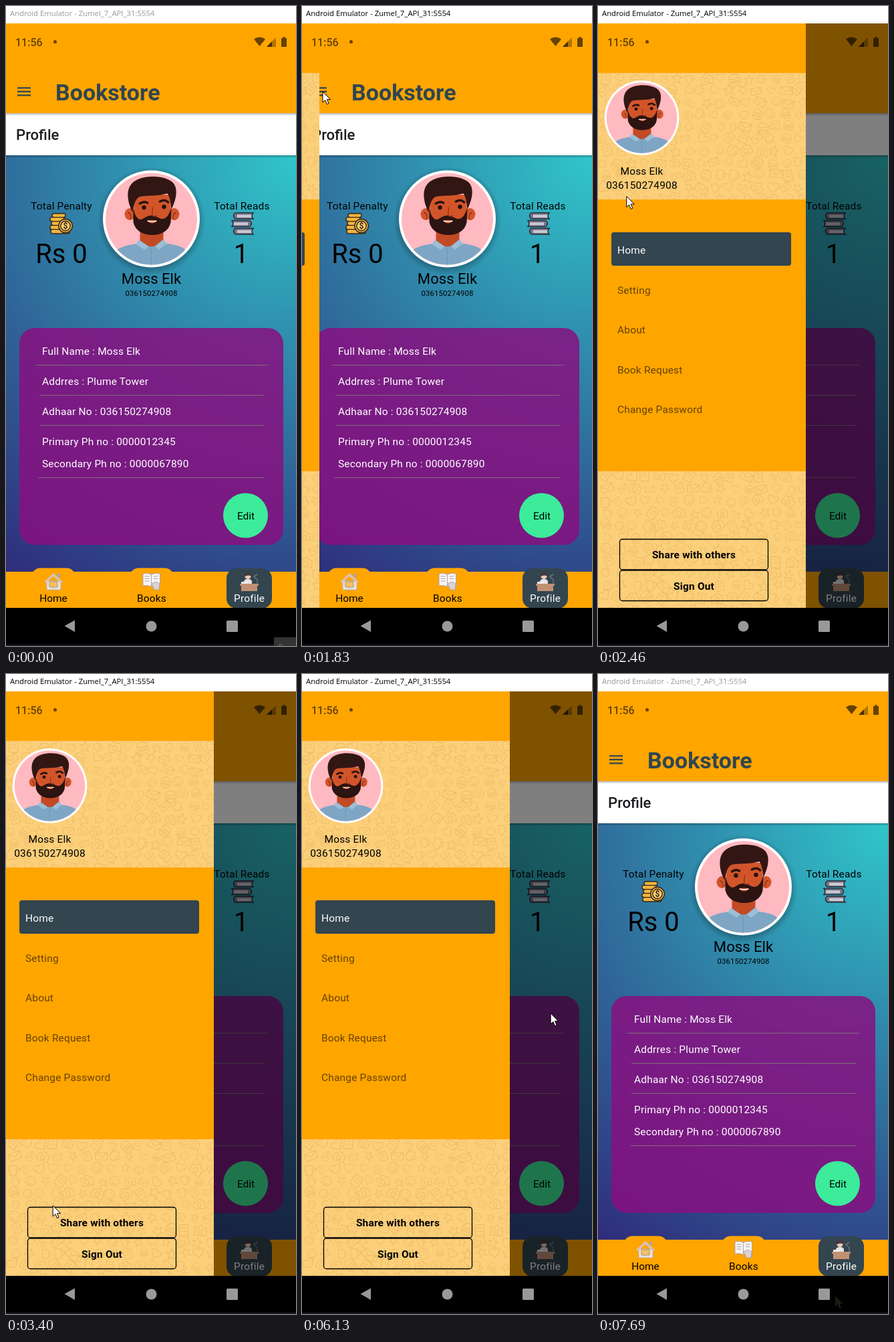
These frames come from a looping animation (434 by 956 pixels, 7760 ms). An HTML page:

```html
<!DOCTYPE html>
<html lang="en">
<head>
<meta charset="utf-8">
<title>Bookstore profile</title>
<style>
  html, body { margin: 0; width: 100%; height: 100%; overflow: hidden; background: #000; }
  svg { display: block; width: 100vw; height: 100vh; }
  text { font: 15.47px Roboto, sans-serif; letter-spacing: .012em; white-space: pre; }
  .mid { text-anchor: middle; }
  .medium { font-weight: 500; }
  .bold { font-weight: 700; }
  .tight { letter-spacing: 0; }
  .line { fill: none; stroke-linecap: round; stroke-linejoin: round; }
</style>
</head>
<body>
<svg viewBox="0 0 434 956" preserveAspectRatio="none">
  <defs>
    <radialGradient id="sea" gradientUnits="userSpaceOnUse" cx="434" cy="224" r="758">
      <stop offset="0" stop-color="#30c6ca"/><stop offset="1" stop-color="#2f2c7b"/>
    </radialGradient>
    <linearGradient id="shade" x2="0" y2="1">
      <stop offset="0" stop-color="#000" stop-opacity=".3"/><stop offset="1" stop-color="#000" stop-opacity="0"/>
    </linearGradient>
    <radialGradient id="halo"><stop offset=".86" stop-opacity=".25"/><stop offset="1" stop-opacity="0"/></radialGradient>
    <clipPath id="round"><circle r="68.5"/></clipPath>
    <clipPath id="top"><rect y="100" width="311" height="189"/></clipPath>
    <clipPath id="bottom"><rect y="695" width="311" height="204"/></clipPath>

    <g id="avatar">
      <circle r="72.5" fill="#fff"/>
      <g clip-path="url(#round)">
        <circle r="69" fill="#ffb9c1"/>
        <path d="M-66 72C-60 46-48 41-22 37H24C48 40 58 46 64 72Z" fill="#7ea6c4"/>
        <path d="M-17 14V37Q0 46 18 36V14Z" fill="#c24a25"/>
        <path d="M-19 31L-4 41-10 46-23 38ZM19 30L5 41 12 46 23 37Z" fill="#9bbfd8"/>
        <path d="M0 42V69" class="line" stroke="#6d94b3" stroke-width=".8"/>
        <ellipse cx="-32" cy="-7" rx="8" ry="9" fill="#d2552a"/>
        <ellipse cx="34" cy="-7" rx="8" ry="9" fill="#d2552a"/>
        <path d="M-35-9q5 0 4 8M37-9q-5 0-4 8" class="line" stroke="#8c2f18" stroke-width="1.3"/>
        <path d="M-26-36H29V2Q25 22 1 23T-26 2Z" fill="#d2552a"/>
        <path d="M-27-18C-25-6-22 0-16 1C-11 0-8-5 0-5S11 0 17 0C23-1 27-6 30-18L29 5C26 19 14 24 1 24S-24 18-27 5Z" fill="#2b1411"/>
        <path d="M-7 3Q1 0 9 3Q2 10-7 3Z" fill="#d2552a"/>
        <path d="M-5 3Q1 5 7 3" class="line" stroke="#fff" stroke-width="1.5"/>
        <path d="M-28-10C-37-27-38-45-28-54C-14-67 24-66 34-52C40-43 37-29 30-14C29-25 28-32 24-38C8-33-8-36-18-33C-25-29-26-20-28-10Z" fill="#321613"/>
        <path d="M-17-23q6-4 11-1M13-26q7-4 12 1" class="line" stroke="#2b1411" stroke-width="3.6"/>
        <circle cx="-11" cy="-17" r="3.2" fill="#241010"/><circle cx="19" cy="-18" r="3.2" fill="#241010"/>
        <path d="M2-17L1-5Q5-2 8-5" class="line" stroke="#8c2f18" stroke-width="1.2"/>
      </g>
    </g>
    <g id="tab"><rect width="68" height="60" rx="15"/></g>
    <g id="book">
      <path d="M2 0H29Q25 5 29 9H2Q-3 4 2 0Z" fill="#77778a"/>
      <path d="M5 2.8H27Q25 5 27 7H5Z" fill="#c9c9d4" stroke="none"/>
    </g>
  </defs>

  <!-- App screen -->
  <rect width="434" height="956" fill="#fff"/>
  <rect y="26" width="434" height="134" fill="#ffa500"/>
  <rect y="223" width="434" height="622" fill="url(#sea)"/>
  <rect y="160" width="434" height="4" fill="url(#shade)"/>
  <rect y="223" width="434" height="4" fill="url(#shade)"/>
  <path d="M17 122.400h20M17 127.900h20M17 133.400h20" stroke="#33454f" stroke-width="2.200"/>
  <text x="74" y="141" class="bold tight" style="font-size:34px" fill="#2f4650">Bookstore</text>
  <text x="15" y="200" class="medium tight" style="font-size:22.1px" fill="#1d1b20">Profile</text>

  <circle cx="217.5" cy="321" r="81" fill="url(#halo)"/>
  <use href="#avatar" x="217.5" y="318"/>
  <g class="mid">
    <text x="83" y="304">Total Penalty</text>
    <text x="353" y="304">Total Reads</text>
    <text x="83" y="384" class="tight" style="font-size:39.8px">Rs 0</text>
    <text x="352" y="384" class="tight" style="font-size:39.8px">1</text>
    <text x="217.5" y="415" class="tight" style="font-size:22.1px">Moss Elk</text>
    <text x="217.5" y="433" style="font-size:11.3px">036150274908</text>
  </g>

  <!-- Coins -->
  <g fill="#f2b63c" stroke="#33241d" stroke-width="1.4">
    <rect x="69" y="310" width="20" height="5.6" rx="2.5"/><rect x="66" y="315.6" width="21" height="6" rx="2.5"/>
    <rect x="68" y="321.6" width="21" height="6" rx="2.5"/><rect x="66" y="327.6" width="21" height="6" rx="2.5"/>
    <rect x="67" y="333.6" width="28" height="6.4" rx="2.5"/>
    <circle cx="89" cy="328.5" r="10.3"/><circle cx="89" cy="328.5" r="7.2" fill="#ffd36b"/>
  </g>
  <text x="89" y="333" class="mid bold" style="font-size:12px" fill="#33241d">$</text>
  <!-- Stacked books -->
  <g stroke="#2d2b38" stroke-width="1.6">
    <use href="#book" x="341" y="309"/><use href="#book" transform="translate(367 320.5) scale(-1 1)"/><use href="#book" x="341" y="332"/>
  </g>

  <!-- Details card -->
  <rect x="20" y="481" width="395" height="324" rx="23" fill="#880f80" opacity=".84"/>
  <path d="M44 536.5H391M50 581.5H386M50 626.5H386M49 704.5H387" stroke="#858078" stroke-opacity=".8"/>
  <g fill="#fff">
    <text x="54" y="520.5">Full Name : Moss Elk</text>
    <text x="54" y="565.5">Addrres : Plume Tower</text>
    <text x="54" y="610.5">Adhaar No : 036150274908</text>
    <text x="54" y="655.5">Primary Ph no : 0000012345</text>
    <text x="54" y="688.5">Secondary Ph no : 0000067890</text>
  </g>
  <circle cx="358.5" cy="761" r="33.5" fill="#3cec9a"/>
  <text x="359" y="767" class="mid tight">Edit</text>

  <!-- Tabs -->
  <g fill="#ffa500">
    <rect y="845" width="434" height="55"/>
    <use href="#tab" x="37" y="839.5"/><use href="#tab" x="184" y="839.5"/>
    <use href="#tab" x="330" y="840" fill="#33454f"/>
  </g>
  <g stroke-width="1">
    <path d="M61 859h21v13H61Z" fill="#e9e3dc" stroke="#b9b1ac"/>
    <path d="M57 860L71 847 85 860 82 862 71 852 60 862Z" fill="#d9c1b2"/>
    <path d="M77 848h4v7l-4-4Z" fill="#aaa3b8"/>
    <path d="M65 860q4-1 6 1 3-2 6-1v8q-4-1-6 1-3-2-6-1Z" fill="#f7c260" stroke="#a88f80"/>
    <path d="M205 848q7-2 12.500 1 6-3 13-1v18q-7-1-13 1-6-2-12.500-1Z" fill="#f8f4f3" stroke="#a9a0a4"/>
    <path d="M217.500 849v17M207.500 852h7M207.500 855.500h7M207.500 859h7M220.500 852h7M220.500 855.500h7" stroke="#aaa2a8"/>
    <path d="M218 863l6-3 6 3-1 9h-7Z" fill="#ddd3d2" stroke="#aaa2a8"/>
    <path d="M356 860q0-4 6-4 6 0 6 4v4h-12Z" fill="#e8e2e4"/>
    <circle cx="362" cy="851.500" r="4.600" fill="#f2c9ae"/>
    <path d="M357 852q-1-6 5-6 6 0 5 6-3-3-10 0Z" fill="#4b3540"/>
    <path d="M350 863h28v3h-2v8h-24v-8h-2Z" fill="#c19174"/>
    <path d="M352 863h9v-3h-9Z" fill="#eee"/>
    <path d="M376 863v-6l-5-5 5-3" class="line" stroke="#6c7079" stroke-width="1.500"/>
  </g>
  <g class="mid">
    <text x="71" y="890" class="tight">Home</text>
    <text x="218" y="890">Books</text>
    <text x="364" y="890" fill="#fff">Profile</text>
  </g>

  <rect id="scrim" y="26" width="434" height="874"/>

  <!-- Navigation drawer -->
  <g id="drawer">
    <rect y="26" width="311" height="873" fill="#ffa500"/>
    <path d="M0 100H311V289H0ZM0 695H311V899H0Z" fill="#fccf7b"/>
    <g clip-path="url(#top)"><g id="doodlesTop"/></g>
    <g clip-path="url(#bottom)"><g id="doodlesBottom"/></g>
    <use href="#avatar" transform="translate(65.500 167) scale(.77)"/>
    <text x="65.500" y="251.500" class="mid">Moss Elk</text>
    <text x="65.500" y="273" class="mid">036150274908</text>
    <rect x="20" y="338" width="269" height="50" rx="4" fill="#33454f"/>
    <g class="medium" fill-opacity=".6">
      <text x="29" y="370" fill="#fff" fill-opacity="1">Home</text>
      <text x="29" y="429.500">Setting</text>
      <text x="29" y="489">About</text>
      <text x="29" y="548.500">Book Request</text>
      <text x="29" y="608">Change Password</text>
    </g>
    <g fill="none" stroke="#000" stroke-width="1.300">
      <rect x="32.500" y="796.500" width="222" height="45.500" rx="4"/><rect x="32.500" y="843" width="222" height="45.500" rx="4"/>
    </g>
    <text x="143.500" y="825" class="mid bold">Share with others</text>
    <text x="143.500" y="872" class="mid bold">Sign Out</text>
  </g>

  <!-- Status bar, system keys and window title -->
  <g fill-opacity=".6">
    <text x="14" y="60" class="medium tight" style="font-size:16px">11:56</text>
    <circle cx="73.500" cy="53.500" r="2.500"/>
    <path d="M371 49.500Q379.500 43.500 388 49.500L379.500 60Z"/>
    <path d="M404 47V61H390Z" fill-opacity=".3"/><path d="M398 53V61H390Z"/>
    <path d="M412 48h2.500v-2h3v2H420v13h-8Z"/>
  </g>
  <rect y="899" width="434" height="57"/>
  <rect y="953.500" width="434" height="2.500" fill="#1c141c"/>
  <g fill="#999">
    <path d="M87.500 926L103 917.500V935Z"/><circle cx="217.500" cy="926.500" r="8"/><rect x="330" y="918" width="17" height="17" rx="1.500"/>
  </g>
  <text id="caption" x="6" y="15" class="tight" style="font:11.3px 'Open Sans',sans-serif">Android Emulator - Zumel_7_API_31:5554</text>
  <g id="corner"><rect x="401" y="943" width="33" height="13" fill="#343434"/><circle cx="411" cy="956" r="2.500" class="line" stroke="#777"/></g>
  <path id="cursor" d="M0 0V16L3.800 12.600 6.400 18.800 9 17.700 6.400 11.600H11.500Z" stroke-width="1"/>
</svg>
<script>
const LOOP = 7760, STEP = LOOP / 114;
const DRAWER_WIDTH = 311, OPEN_AT = 1828.5, CLOSE_AT = 6947, SLIDE = 546;
const $ = id => document.getElementById(id);

// Cursor stops: time, x, y
const stops = [
  [460, 410, 937], [800, 270, 380], [1080, 130, 0], [1230, 36, 70], [1430, 31, 128], [2200, 31, 128],
  [2860, 62, 540], [3130, 56, 680], [3400, 70, 796], [3690, 83, 640], [4030, 97, 338], [4180, 97, 338],
  [4450, 69, 500], [4950, 279, 672], [5170, 240, 859], [5450, 133, 600], [5650, 230, 394], [5800, 311, 500],
  [5950, 330, 690], [6130, 373, 503], [6420, 373, 462], [6750, 373, 462], [6880, 355, 585], [7060, 355, 585],
  [7340, 355, 929]
];

// Outline doodles scattered over the paper-coloured panels
const shapes = [
  'M-6-7H5V7H-6ZM-3-3H2M-3 1H2',
  'M-7-1Q-6-7 0-7T7-1ZM-8 2H8M-7 4H7Q6 8 0 8T-7 4',
  'M-7-4H-3L-1-7H3L4-4H8V6H-7ZM3 1A3 3 0 1 1-3 1A3 3 0 1 1 3 1',
  'M0-7L2-2 7-2 3 1 5 7 0 4-5 7-3 1-7-2-2-2Z',
  'M0 6C-14-4-4-10 0-4C4-10 14-4 0 6Z',
  'M-5-6H4V3Q4 7 0 7T-5 3ZM4-3Q9-3 8 0T4 3',
  'M7 0A7 7 0 1 1-7 0A7 7 0 1 1 7 0M-3-2V-1M3-2V-1M-3 3Q0 6 3 3',
  'M-8-5H8V5H-8ZM-8-5L0 2 8-5'
];
function scatter(target, top, height, seed) {
  const random = () => (seed = seed * 16807 % 2147483647) / 2147483647;
  let marks = '';
  for (let y = top + 6; y < top + height + 10; y += 18)
    for (let x = 4 + (y % 4) * 3; x < DRAWER_WIDTH + 10; x += 21) {
      const shape = shapes[Math.floor(random() * shapes.length)];
      const place = `translate(${x + random() * 6} ${y + random() * 5}) rotate(${random() * 90 - 45})`;
      marks += `<path d="${shape}" transform="${place} scale(${.8 + random() * .4})"/>`;
    }
  $(target).innerHTML = `<g class="line" stroke="#edbd64" stroke-width=".9">${marks}</g>`;
}
scatter('doodlesTop', 100, 189, 71);
scatter('doodlesBottom', 695, 204, 523);

function settle(time, start) {
  const p = Math.min(1, Math.max(0, (time - start) / SLIDE));
  return 1 - (1 - p) ** 5;
}

function cursorAt(time) {
  const next = stops.findIndex(stop => stop[0] > time);
  if (next === 0) return stops[0].slice(1);
  if (next < 0) return stops.at(-1).slice(1);
  const [t0, x0, y0] = stops[next - 1], [t1, x1, y1] = stops[next];
  const p = (time - t0) / (t1 - t0);
  return [x0 + (x1 - x0) * p, y0 + (y1 - y0) * p];
}

function draw(now) {
  // The screen refreshes in discrete steps
  const time = Math.min(113, Math.floor(now % LOOP / STEP + .2)) * STEP;
  const open = settle(time, OPEN_AT) - settle(time, CLOSE_AT);
  $('drawer').setAttribute('transform', `translate(${Math.round((open - 1) * DRAWER_WIDTH)} 0)`);
  $('drawer').style.display = open > .001 ? '' : 'none';
  // Dimming starts once the drawer's edge is well in view
  $('scrim').setAttribute('opacity', open > .1 ? open / 2 : 0);
  $('caption').setAttribute('fill', time > 1760 && time < 7660 ? '#000' : '#999');
  $('corner').style.display = time < 60 ? '' : 'none';

  const [x, y] = cursorAt(time), left = time > 7340;
  const cursor = $('cursor');
  cursor.style.display = time > 440 ? '' : 'none';
  cursor.setAttribute('transform', `translate(${x} ${y})`);
  cursor.setAttribute('fill', left ? '#1f1a10' : '#fff');
  cursor.setAttribute('stroke', left ? 'none' : '#000');
}

const begin = performance.now();
function tick() {
  draw(performance.now() - begin);
  requestAnimationFrame(tick);
}
tick();
</script>
</body>
</html>
```
